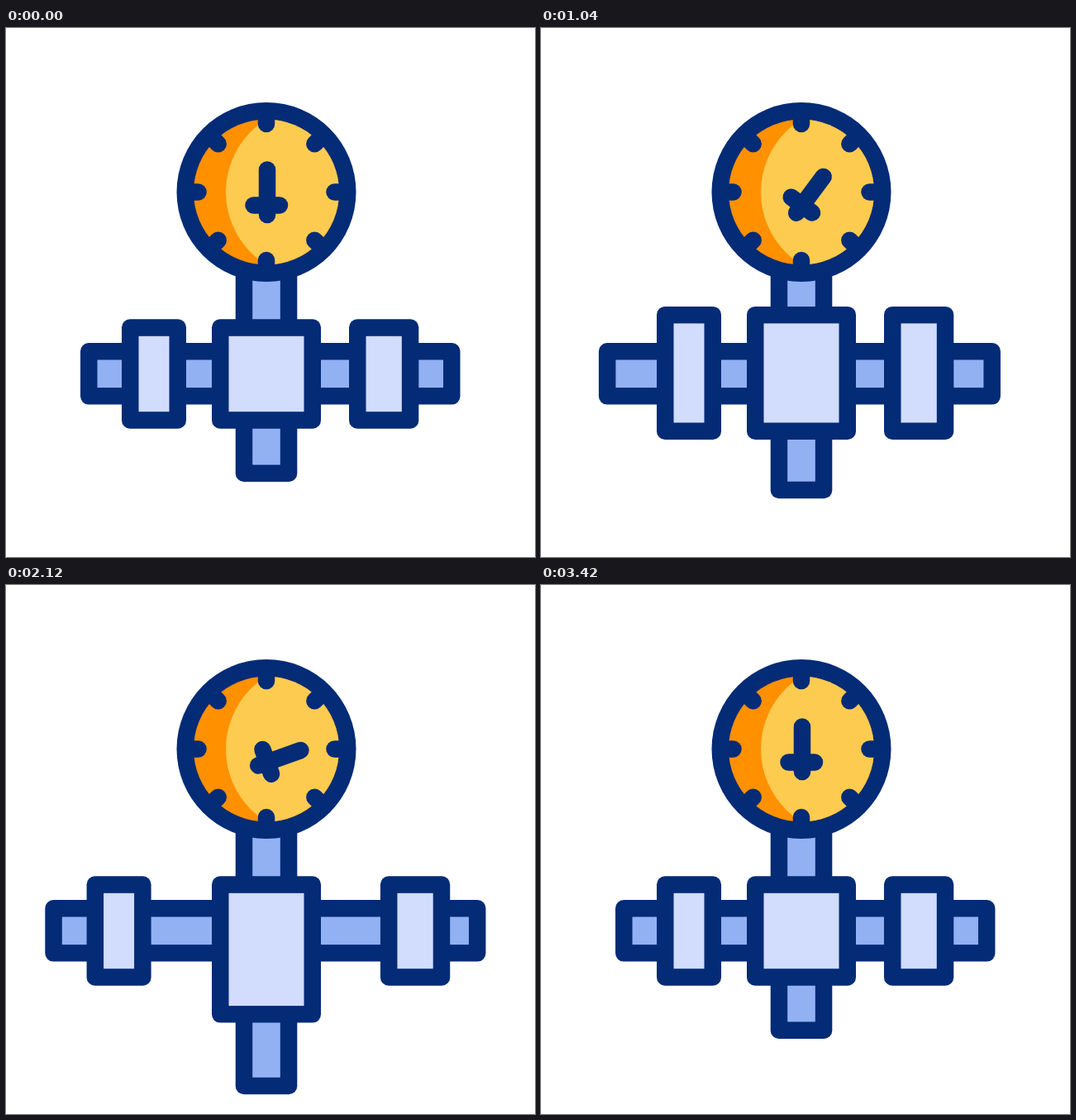
These frames come from a looping animation (640x640 px, 3.6 s). An HTML page with a canvas:

```html
<!DOCTYPE html>
<html lang="en">
<head>
<meta charset="utf-8">
<title>Pressure gauge</title>
<style>
  html, body { margin: 0; width: 100%; height: 100%; overflow: hidden; background: #fff; }
  canvas { display: block; width: 640px; height: 640px; }
</style>
</head>
<body>
<canvas id="stage" width="640" height="640"></canvas>
<script>
const ctx = document.getElementById("stage").getContext("2d");
const LOOP = 3600;
const NAVY = "#042b76", PIPE = "#92b1f3", PALE = "#d2dcfd", YELLOW = "#fdcb50", ORANGE = "#ff9000";
const LINE = 20.5;

// Pose times shared by the pipework; the needle lags behind.
const PIPE_TIMES = [280, 800, 1360, 2030, 2640, 3440];
const NEEDLE_TIMES = [270, 960, 1515, 2115, 2690, 3440];

const POSES = {
  left: [90, 49.3, 101.2, 43.7, 103.5, 90],
  right: [549.5, 572.7, 530.4, 584.5, 516.8, 549.5],
  bottom: [549, 596, 528.3, 622, 526.8, 549],
  stretchUp: [0, 25.5, 0, 0, 0, 0],
  stretchDown: [0, 22, 0, 0, 0, 0],
  boxDrop: [0, 0, 0, 47.6, 2.9, 0],
  flangeLeft: [0, 0, 0, -45.9, 12.1, 0],
  flangeRight: [0, 0, 0, 41.3, -15, 0]
};
const NEEDLE_ANGLES = [0, 41, -35, 70.3, -15, 0];

function sample(times, values, t) {
  if (t <= times[0]) return values[0];
  const next = times.findIndex(time => t < time);
  if (next < 0) return values[values.length - 1];
  const u = (t - times[next - 1]) / (times[next] - times[next - 1]);
  return values[next - 1] + (values[next] - values[next - 1]) * u * u * (3 - 2 * u);
}

function frameRect(x1, y1, x2, y2, fill) {
  ctx.fillStyle = NAVY;
  ctx.beginPath();
  ctx.roundRect(x1, y1, x2 - x1, y2 - y1, 10);
  ctx.fill();
  ctx.fillStyle = fill;
  ctx.fillRect(x1 + LINE, y1 + LINE, x2 - x1 - 2 * LINE, y2 - y1 - 2 * LINE);
}

function disc(x, y, r, fill) {
  ctx.fillStyle = fill;
  ctx.beginPath();
  ctx.arc(x, y, r, 0, Math.PI * 2);
  ctx.fill();
}

function stroke(x1, y1, x2, y2) {
  ctx.beginPath();
  ctx.moveTo(x1, y1);
  ctx.lineTo(x2, y2);
  ctx.stroke();
}

function drawDial(angle) {
  const cx = 315, cy = 198.5;
  disc(cx, cy, 108.5, NAVY);
  ctx.save();
  ctx.beginPath();
  ctx.arc(cx, cy, 88, 0, Math.PI * 2);
  ctx.clip();
  ctx.fillStyle = ORANGE;
  ctx.fillRect(200, 90, 230, 220);
  disc(369.5, cy, 103.5, YELLOW);
  ctx.restore();

  ctx.strokeStyle = NAVY;
  ctx.lineWidth = LINE;
  ctx.lineCap = "round";
  for (let i = 0; i < 8; i++) {
    const dx = Math.cos(i * Math.PI / 4), dy = Math.sin(i * Math.PI / 4);
    stroke(cx + 82.5 * dx, cy + 82.5 * dy, cx + 97 * dx, cy + 97 * dy);
  }

  ctx.save();
  ctx.translate(316, 214.5);
  ctx.rotate(angle * Math.PI / 180);
  stroke(0, -43, 0, 11.5);
  stroke(-16.5, 0, 15, 0);
  ctx.restore();
}

function draw(t) {
  const p = {};
  for (const name in POSES) p[name] = sample(PIPE_TIMES, POSES[name], t);
  const top = 352.3 - p.stretchUp;
  const base = 484.7 + p.stretchDown;

  ctx.fillStyle = "#fff";
  ctx.fillRect(0, 0, 640, 640);
  frameRect(277.7, 225, 352.3, p.bottom, PIPE);
  frameRect(p.left, 381, p.right, 455.6, PIPE);
  frameRect(140 + p.flangeLeft, top, 218 + p.flangeLeft, base, PALE);
  frameRect(415 + p.flangeRight, top, 499.3 + p.flangeRight, base, PALE);
  frameRect(249, top, 381, base + p.boxDrop, PALE);
  drawDial(sample(NEEDLE_TIMES, NEEDLE_ANGLES, t));
}

const start = performance.now();
function tick() {
  draw((performance.now() - start) % LOOP);
  requestAnimationFrame(tick);
}
tick();
</script>
</body>
</html>
```
